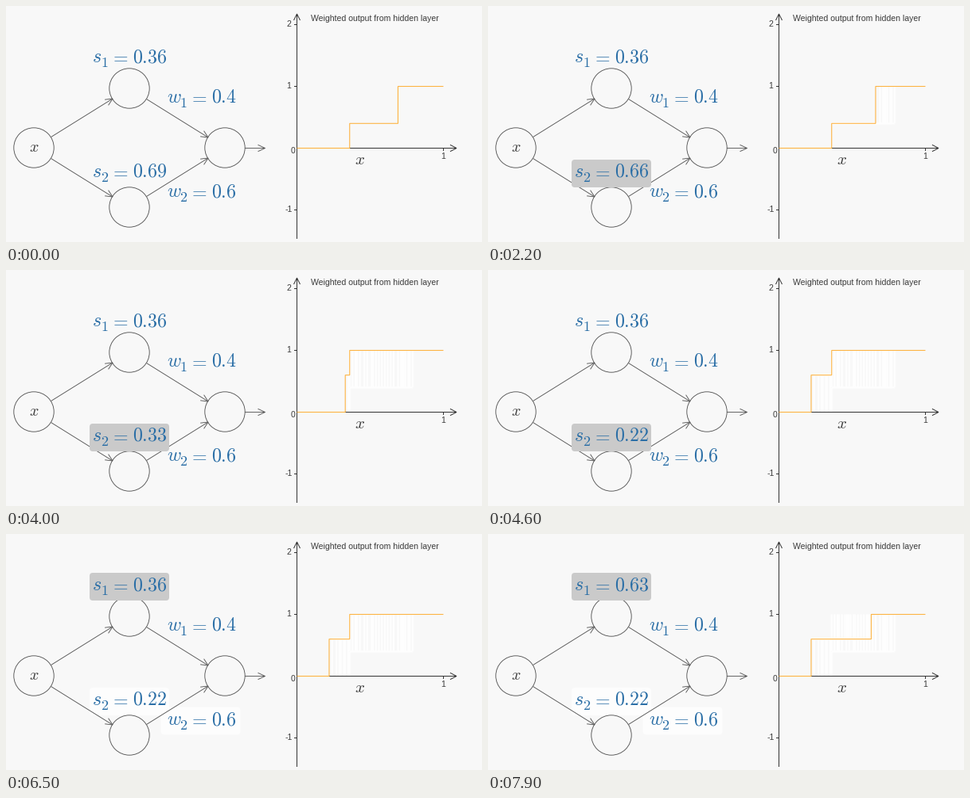
Animation of 598x298 px, one loop 8 s. Source, as a matplotlib script:

```python
import matplotlib.pyplot as plt
import numpy as np
from matplotlib.animation import FuncAnimation
from matplotlib.collections import LineCollection
from matplotlib.patches import Circle, FancyBboxPatch

W, H, DPI = 598, 298, 100
PX = 72 / DPI
FRAMES, INTERVAL = 80, 100
BG, WASH, HOVER, PRESSED = "#f8f8f8", "#fdfdfd", "#dedede", "#cacaca"
BLUE, INK, LINE, AXIS, ORANGE = "#2a6ea6", "#3c3c3c", "#555555", "#333333", "#fdb443"
W1, W2 = 0.4, 0.6

# Dragged values: frame number, value
S1_KEYS = [(67, .36), (76, .56), (79, .63)]
S2_KEYS = [(13, .69), (19, .79), (20, .79), (21, .73), (22, .66), (29, .52),
           (30, .51), (33, .43), (34, .43), (40, .33), (43, .29), (46, .22)]

plt.rcParams["mathtext.fontset"] = "cm"
plt.rcParams["path.snap"] = False
fig = plt.figure(figsize=(W / DPI, H / DPI), dpi=DPI, facecolor=BG)
ax = fig.add_axes([0, 0, 1, 1])
ax.set_xlim(0, W)
ax.set_ylim(H, 0)
ax.axis("off")


def graph(x, y):
    return 365.5 + 184 * x, 179.5 - 78 * y


def line(points, color=LINE, width=0.9, z=2):
    xs, ys = zip(*points)
    return ax.plot(xs, ys, color=color, lw=width * PX, zorder=z,
                   solid_capstyle="butt", solid_joinstyle="miter")[0]


def arrow(start, end, color=LINE, length=9, spread=4.2, width=0.9):
    start, end = np.array(start), np.array(end)
    along = (end - start) / np.hypot(*(end - start))
    side = np.array([-along[1], along[0]]) * spread
    back = end - along * length
    line([start, end], color, width)
    line([back + side, end, back - side], color, width)


def label(x, y, text, ha="center"):
    ax.text(x, y, text, fontsize=10.56 * PX, family="Liberation Sans",
            color=INK, ha=ha, va="baseline", zorder=4)


def math(x, y, text, size=24, color=BLUE, ha="left"):
    return ax.text(x, y, f"${text}$", fontsize=size * PX, color=color, ha=ha,
                   va="baseline", zorder=7)


def formula(x, base, name, index, number_x, value):
    math(x, base, name)
    math(x + (10.5 if name == "s" else 16.8), base + 6, index, 18)
    math(number_x - 29, base, "=")
    return math(number_x, base, value)


def box(x0, y0, x1, y1):
    patch = FancyBboxPatch((x0 + 4, y0 + 4), x1 - x0 - 8, y1 - y0 - 8,
                           boxstyle="round,pad=4,rounding_size=4", lw=0)
    return ax.add_patch(patch)


# Network
for center in [(35, 179), (155, 104), (275, 179), (155, 254)]:
    ax.add_patch(Circle(center, 25.2, fill=False, ec=LINE, lw=0.9 * PX, zorder=2))
for start, end in [((56.5, 165.5), (134, 117)), ((56.5, 192.5), (134, 241)),
                   ((176.5, 117.5), (254, 166)), ((176.5, 240.5), (254, 192)),
                   ((300, 179.5), (325.5, 179.5))]:
    arrow(start, end)
math(35, 183.5, "x", 20, INK, "center")

s1_text = formula(108.3, 71, "s", "1", 159.3, "0.36")
s2_text = formula(108.3, 216, "s", "2", 159.3, "0.69")
formula(201.5, 122, "w", "1", 258, "0.4")
formula(201.5, 241, "w", "2", 258, "0.6")
s1_box = box(105, 49, 205, 84)
s2_box = box(105, 194, 205, 229)
w2_box = box(194.5, 218.5, 294.5, 253.5)

# Graph
arrow((365.5, 294), (365.5, 10), AXIS, 8, 4, 1)
arrow((365.5, 179.5), (566, 179.5), AXIS, 8, 4.2, 1)
for v in (2, 1, -1):
    y = graph(0, v)[1]
    line([(362, y), (365, y)], AXIS, 1)
    label(355.5, y + 2.5, str(v))
line([(549.5, 180), (549.5, 183)], AXIS, 1)
label(549, 193, "1")
label(361, 186, "0")
label(383, 19, "Weighted output from hidden layer", "left")
math(445, 200, "x", 21, INK, "center")

trail = ax.add_collection(LineCollection([], colors="#fefefe", linewidths=2.2 * PX,
                                         capstyle="butt", zorder=1))
curve = line([(0, 0), (1, 1)], ORANGE, 1.1, 6)


def value(keys, n):
    return round(float(np.interp(n, *zip(*keys))), 2)


def step_curve(n):
    (a, mid), (b, _) = sorted([(value(S1_KEYS, n), W1), (value(S2_KEYS, n), W2)])
    return [(0, 0), (a, 0), (a, mid), (b, mid), (b, 1), (1, 1)]


def inner_parts(points):
    """Both risers and the plateau between them."""
    return list(zip(points[1:4], points[2:5]))


def paint(patch, color, z):
    patch.set_visible(color is not None)
    if color:
        patch.set_facecolor(color)
        patch.set_zorder(z)


def paint_control(patch, n, hover, press, leave):
    if n < hover:
        paint(patch, None, 0)
    elif n < leave:
        paint(patch, HOVER if n < press else PRESSED, 3)
    else:
        paint(patch, WASH, 0.5)


def update(n):
    s1_text.set_text(f"${value(S1_KEYS, n):.2f}$")
    s2_text.set_text(f"${value(S2_KEYS, n):.2f}$")
    paint_control(s1_box, n, 58, 65, FRAMES)
    paint_control(s2_box, n, 8, 14, 52)
    paint_control(w2_box, n, 54, 55, 55)

    now = step_curve(n)
    past = {part for k in range(n) for part in inner_parts(step_curve(k))}
    past -= set(inner_parts(now))
    trail.set_segments([[graph(*p), graph(*q)] for p, q in sorted(past)])
    curve.set_data(*zip(*(graph(*p) for p in now)))
    return s1_text, s2_text, s1_box, s2_box, w2_box, trail, curve


anim = FuncAnimation(fig, update, frames=FRAMES, interval=INTERVAL,
                     repeat=True, repeat_delay=0, blit=False)
plt.show()
```
